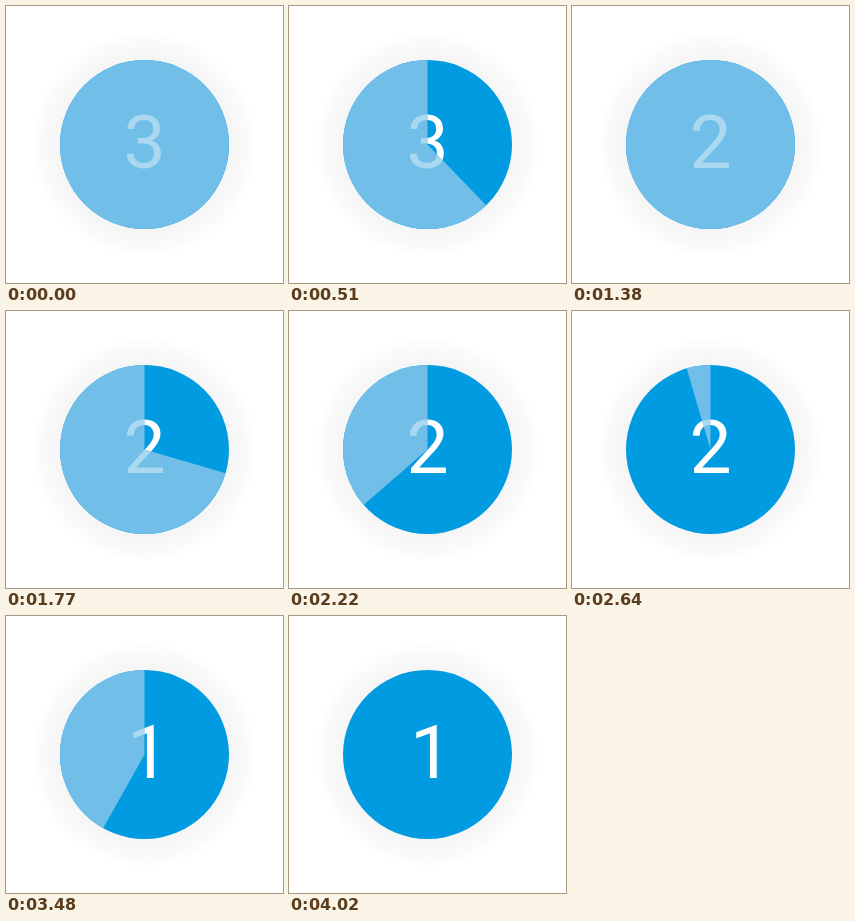
An HTML page with a canvas that plays this animation: 277x277 px, repeating every 4.2 s.

```html
<!DOCTYPE html>
<html lang="en">
<head>
<meta charset="utf-8">
<title>Countdown</title>
<style>
html, body { margin: 0; width: 100%; height: 100%; overflow: hidden; background: #fff; }
canvas { display: block; }
</style>
</head>
<body>
<canvas id="stage" width="277" height="277"></canvas>
<script>
const ctx = document.getElementById('stage').getContext('2d');
const C = 138.5, R = 84.5, STEP = 30, LOOP = 4200, LAST = 134;
// Each digit sweeps a full turn between its start and end step.
const sweeps = [
  { digit: '3', start: 0, end: 45, x: C },
  { digit: '2', start: 46, end: 90, x: C },
  { digit: '1', start: 91, end: 134, x: C + 3.5 }
];

const halo = ctx.createRadialGradient(C, C, R, C, C, 113);
halo.addColorStop(0, '#f5f5f5');
halo.addColorStop(0.6, '#fafafa');
halo.addColorStop(1, '#fff');

ctx.font = '75px Roboto, Arial, sans-serif';
ctx.textAlign = 'center';

function disc(radius, fill) {
  ctx.fillStyle = fill;
  ctx.beginPath();
  ctx.arc(C, C, radius, 0, 2 * Math.PI);
  ctx.fill();
}

function face(label, fill, ink) {
  disc(R, fill);
  ctx.fillStyle = ink;
  ctx.fillText(label.digit, label.x, 162);
}

function draw(now) {
  const step = Math.min(LAST, Math.floor(now % LOOP / STEP));
  const sweep = sweeps.find(s => step <= s.end);
  const part = (step - sweep.start) / (sweep.end - sweep.start);
  const label = sweeps[Math.floor(step / 45)];

  ctx.fillStyle = '#fff';
  ctx.fillRect(0, 0, 277, 277);
  disc(113, halo);
  face(label, '#009be1', '#fff');

  // The part not yet swept stays pale.
  if (part < 1) {
    ctx.save();
    ctx.beginPath();
    ctx.moveTo(C, C);
    ctx.arc(C, C, R + 2, (2 * part - 0.5) * Math.PI, 1.5 * Math.PI);
    ctx.clip();
    face(label, '#71bfe9', '#aad8f1');
    ctx.restore();
  }
  requestAnimationFrame(loop);
}

let origin;
function loop(now) {
  origin ??= now;
  draw(now - origin);
}
draw(0);
</script>
</body>
</html>
```
